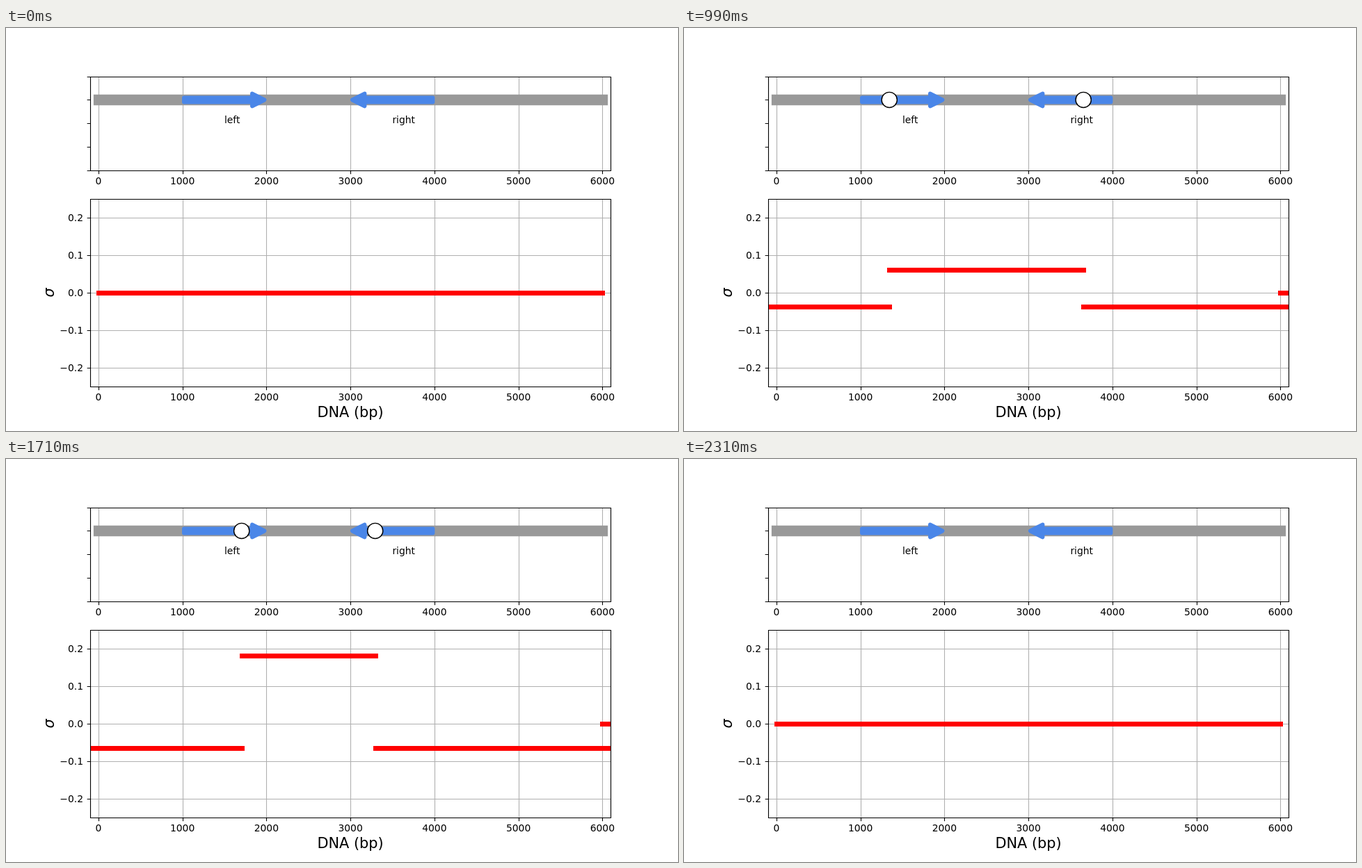
Recreate the animation shown at these times as an HTML page. Size 966 by 580 pixels, loop 3.1 s.

```html
<!DOCTYPE html>
<html lang="en">
<head>
<meta charset="utf-8">
<title>Supercoiling between two converging genes</title>
<style>
  html, body { margin: 0; width: 100%; height: 100%; overflow: hidden; background: #fff; }
  svg { display: block; width: 966px; height: 580px; }
  text { font: 13.89px "DejaVu Sans", Verdana, sans-serif; }
  .big { font-size: 20.83px; }
  .mid { text-anchor: middle; }
  .end { text-anchor: end; }
  path { fill: none; }
  .grid { stroke: #b0b0b0; stroke-width: 1.11; }
  .axis { stroke: #000; stroke-width: 1.11; }
  .dna { stroke: #999; stroke-width: 15.28; stroke-linecap: square; }
  .gene { fill: #4a86e8; stroke: #4a86e8; stroke-width: 6; stroke-linejoin: round; }
  .sigma { stroke: #f00; stroke-width: 6.94; stroke-linecap: square; }
  circle { fill: #fff; stroke: #000; stroke-width: 1.39; }
</style>
</head>
<body>
<svg viewBox="0 0 966 580">
  <clipPath id="plot"><rect x="121" y="246" width="748.4" height="270.5"/></clipPath>
  <path class="grid" id="grid"/>
  <path class="dna" id="dna"/>
  <path class="gene" id="gene" d="M256 100.5H354V94.6L371.4 103.5L354 112.4V106.5H256Z"/>
  <use href="#gene" transform="translate(869.4) scale(-1 1)"/>
  <g id="polymerases">
    <circle id="leftPol" cy="103.43" r="11.11"/>
    <circle id="rightPol" cy="103.43" r="11.11"/>
  </g>
  <path class="sigma" id="sigma" clip-path="url(#plot)"/>
  <path class="axis" id="axis"/>
  <g id="labels">
    <text x="313.9" y="137">left</text>
    <text x="555.4" y="137">right</text>
    <text class="big mid" x="495.1" y="560">DNA (bp)</text>
    <text class="big mid" transform="translate(69 381) rotate(-90)" font-style="italic" style="font-style:oblique">σ</text>
  </g>
</svg>
<script>
const $ = id => document.getElementById(id);
const LOOP = 3100, START = 330, END = 2310, STEP = 30;
const SPEED = 15, TWIST = 0.1997, GAP = 30;

const snap = v => Math.floor(v + 0.5) + 0.5;
const xOf = bp => 132.825 + bp * 0.12075;
const yOf = s => 380.867 - s * 541.34;
const hline = (a, b, y) => `M${snap(xOf(a))} ${snap(y)}H${snap(xOf(b))}`;

function addLabel(text, x, y, cls) {
  const el = document.createElementNS("http://www.w3.org/2000/svg", "text");
  el.textContent = text;
  el.setAttribute("x", x);
  el.setAttribute("y", y);
  el.setAttribute("class", cls);
  $("labels").append(el);
}

function drawAxes() {
  let grid = "", axis = "M121.5 70.5H869.5V205.5H121.5ZM121.5 246.5H869.5V516.5H121.5Z";
  for (let bp = 0; bp <= 6000; bp += 1000) {
    const x = snap(xOf(bp));
    grid += `M${x} 70V205M${x} 246V516`;
    axis += `M${x} 205.5v4.86M${x} 516.5v4.86`;
    addLabel(bp, xOf(bp), 225, "mid");
    addLabel(bp, xOf(bp), 536.3, "mid");
  }
  for (let i = -2; i <= 2; i++) {
    const y = snap(yOf(i / 10));
    grid += `M121 ${y}H869`;
    axis += `M121.5 ${y}h-4.86`;
    addLabel((i < 0 ? "\u2212" : "") + (Math.abs(i) / 10).toFixed(1), 111, y + 4.7, "end");
  }
  for (let i = 0; i <= 4; i++) axis += `M121.5 ${snap(69.6 + i * 33.833)}h-4.86`;
  $("grid").setAttribute("d", grid);
  $("axis").setAttribute("d", axis);
  $("dna").setAttribute("d", hline(0, 6000, 103.43 - 0.5));
}

let shown = -1;

function draw(step) {
  if (step === shown) return;
  shown = step;
  $("polymerases").style.display = step ? "" : "none";
  let d = hline(0, 6000, yOf(0));
  if (step) {
    const moved = SPEED * step, left = 1000 + moved, right = 4000 - moved;
    const turns = TWIST * 2 * moved;
    const inner = yOf(turns / (3000 - 2 * moved - GAP));
    const outer = yOf(-turns / (3000 + 2 * moved - GAP));
    $("leftPol").setAttribute("cx", xOf(left));
    $("rightPol").setAttribute("cx", xOf(right));
    d = hline(-300, left, outer) + hline(left, right, inner) +
        hline(right, 6300, outer) + hline(6000, 6300, yOf(0));
  }
  $("sigma").setAttribute("d", d);
}

function tick(now) {
  const t = now % LOOP;
  draw(t >= START && t < END ? Math.floor((t - START) / STEP) + 1 : 0);
  requestAnimationFrame(tick);
}

drawAxes();
draw(0);
requestAnimationFrame(tick);
</script>
</body>
</html>
```
